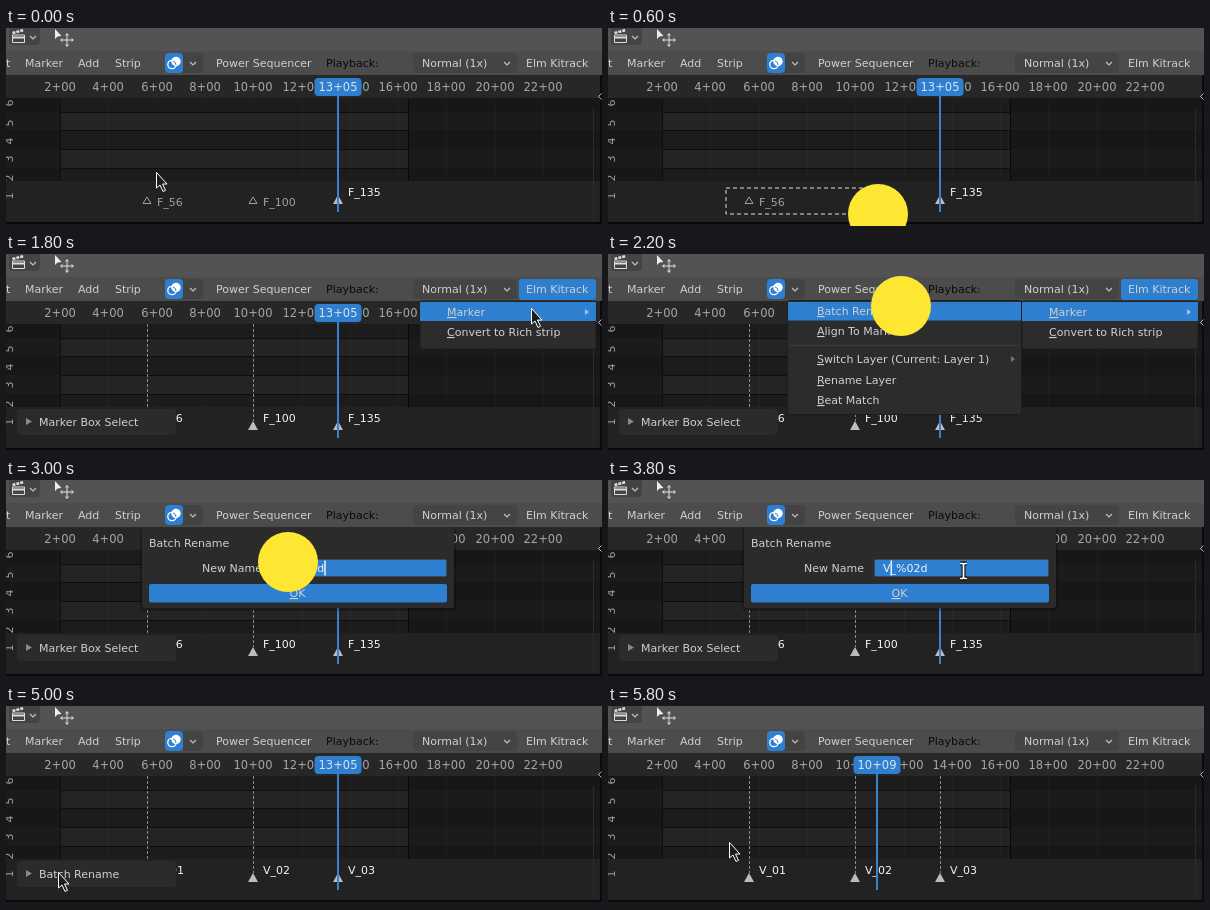
An HTML page that plays this animation: 596 px wide and 198 px high, repeating every 6000 ms.

```html
<!DOCTYPE html>
<html lang="en">
<head>
<meta charset="utf-8">
<title>Batch renaming markers</title>
<style>
html, body { margin: 0; width: 100%; height: 100%; overflow: hidden; background: #1a1a1a; }
svg { display: block; width: 596px; height: 198px; }
text { font: 11px "DejaVu Sans", Verdana, sans-serif; fill: #d0d0d0; white-space: pre; }
.tick { font-size: 11.5px; fill: #a6a6a6; }
.mid { text-anchor: middle; }
.key { text-decoration: underline; text-underline-offset: 2px; }
</style>
</head>
<body>
<svg id="stage" viewBox="0 0 596 198"></svg>
<script>
const NS = 'http://www.w3.org/2000/svg';
const stage = document.getElementById('stage');
const BLUE = '#2f7fd0';
const LOOP = 6000, STEP = 200;

function add(parent, tag, attrs = {}, content) {
  const el = document.createElementNS(NS, tag);
  for (const k in attrs) el.setAttribute(k, attrs[k]);
  if (content !== undefined) el.textContent = content;
  parent.appendChild(el);
  return el;
}
const group = (p = stage) => add(p, 'g');
const box = (p, x, y, width, height, fill, rx = 0, more = {}) =>
  add(p, 'rect', { x, y, width, height, fill, rx, ...more });
const label = (p, x, y, s, more = {}) => add(p, 'text', { x, y, ...more }, s);
const path = (p, d, more = {}) => add(p, 'path', { d, fill: 'none', ...more });
const show = (el, on) => el.setAttribute('display', on ? 'inline' : 'none');
const frameX = f => Math.round(5.7 + 2.415 * f);

// Label whose first letter is an underlined shortcut key
function keyLabel(p, x, y, s, more = {}) {
  const t = add(p, 'text', { x, y, ...more });
  add(t, 'tspan', { class: 'key' }, s[0]);
  add(t, 'tspan', {}, s.slice(1));
}
const chevron = (p, x, y) =>
  path(p, `M${x - 3} ${y - 1.5}l3 3l3 -3`, { stroke: '#c0c0c0', 'stroke-width': 1.2 });

function drawTimeline() {
  const g = group();
  box(g, 0, 46, 596, 152, '#191919');
  const rows = [70, 84, 102, 121, 140, 153];
  rows.slice(0, -1).forEach((y, i) => {
    const h = rows[i + 1] - y;
    box(g, 0, y, 594, h, i % 2 ? '#1b1b1b' : '#171717');
    box(g, 54, y, 349, h, i % 2 ? '#242424' : '#1c1c1c');
    if (i) box(g, 54, y, 349, 1, '#0e0e0e');
  });
  box(g, 0, 153, 594, 41, '#222');
  box(g, 54, 70, 1, 83, '#090909');
  box(g, 402, 70, 1, 83, '#090909');
  for (let s = 2; s <= 22; s += 2)
    box(g, frameX(s * 10), 70, 1, 83, '#fff', 0, { opacity: 0.025 });
  box(g, 0, 46, 596, 24, '#272727');
  for (let s = 2; s <= 22; s += 2)
    label(g, frameX(s * 10), 63, `${s}+00`, { class: 'tick mid' });
  [75, 95, 113, 131, 150, 168].forEach((y, i) =>
    label(g, 0, 0, 6 - i, { class: 'mid', transform: `translate(7 ${y}) rotate(-90)`, style: 'fill:#a0a0a0' }));
  box(g, 587, 80, 1, 113, '#2b2b2b');
  box(g, 594, 46, 2, 150, '#0b0b0b');
  box(g, 0, 194, 596, 2, '#080808');
  path(g, 'M595.5 65.5l-3 3l3 3', { stroke: '#bbb' });
}

function makeMarker(frame) {
  const g = group(), x = frameX(frame);
  const off = group(g), on = group(g);
  path(off, `M${x} 169l4 6.5h-8z`, { stroke: '#a0a0a0' });
  const offText = label(off, x + 10, 178, '', { style: 'fill:#a0a0a0' });
  path(on, `M${x + 0.5} 70V167`, { stroke: '#8c8c8c', 'stroke-dasharray': '3 2' });
  path(on, `M${x} 167l5 9h-10z`, { fill: '#bcbcbc' });
  const onText = label(on, x + 10, 168, '', { style: 'fill:#f4f4f4' });
  return (selected, name) => {
    show(on, selected);
    show(off, !selected);
    onText.textContent = offText.textContent = name;
  };
}

function makePlayhead() {
  const g = group();
  box(g, -1, 60, 2, 124, '#3a82cd');
  box(g, -23.5, 50, 47, 18, BLUE, 4);
  const t = label(g, 0, 63, '', { class: 'tick mid', style: 'fill:#d8e2ec' });
  return f => {
    g.setAttribute('transform', `translate(${frameX(f)} 0)`);
    t.textContent = `${Math.floor(f / 10)}+0${f % 10}`;
  };
}

function makePanel() {
  const g = group();
  box(g, 11, 155, 159, 26, '#2b2b2b', 4);
  path(g, 'M20 164l6 3.5l-6 3.5z', { fill: '#8a8a8a' });
  const t = label(g, 33, 172, '');
  return title => {
    show(g, title);
    t.textContent = title;
  };
}

function makeHeader() {
  const g = group();
  box(g, 0, 0, 596, 23, '#535353');
  box(g, 0, 23, 596, 24, '#4c4c4c');
  box(g, 3, -4, 31, 21, '#444', 4);
  // clapper board
  path(g, 'M6.500 7h12v7.500h-12z', { stroke: '#ddd' });
  path(g, 'M6.500 5l11.500 -3', { stroke: '#ddd', 'stroke-width': 2.5, 'stroke-dasharray': '3 1' });
  path(g, 'M6 9.500h12', { stroke: '#ddd', 'stroke-width': 2 });
  chevron(g, 27, 9.5);
  // select-and-move tool
  path(g, 'M49 1v10l2.500 -2.500l4 -.5z', { fill: '#eee' });
  path(g, 'M61 6v12M55 12h12M59.500 7.500l1.500 -2l1.500 2M59.500 16.500l1.500 2l1.500 -2M56.500 10.500l-2 1.500l2 1.500M65.500 10.500l2 1.500l-2 1.500',
    { stroke: '#e4e4e4' });
  label(g, 0, 39, 't');
  label(g, 19, 39, 'Marker');
  label(g, 72, 39, 'Add');
  label(g, 109, 39, 'Strip');
  box(g, 159, 25, 38, 20, '#434343', 4);
  box(g, 159, 25, 18, 20, BLUE, 4);
  add(g, 'circle', { cx: 170, cy: 33.5, r: 4.7, fill: '#fff' });
  add(g, 'circle', { cx: 166, cy: 36.5, r: 4.2, fill: 'none', stroke: '#fff', 'stroke-width': 1.3 });
  path(g, 'M167 33a4 4 0 0 1 3 4', { stroke: BLUE });
  chevron(g, 187, 35.5);
  label(g, 210, 39, 'Power Sequencer');
  label(g, 320, 39, 'Playback:', { style: 'fill:#0a0a0a' });
  box(g, 407, 25, 104, 20, '#444', 4);
  label(g, 416, 39, 'Normal (1x)');
  chevron(g, 501, 35.5);
  const hot = box(g, 513, 25, 77, 21, BLUE, 3);
  label(g, 520, 39, 'Elm Kitrack');
  return on => show(hot, on);
}

function makeMenus() {
  const main = group(), sub = group();
  const arrow = (p, x, y, fill) => path(p, `M${x} ${y - 3}l4 3l-4 3z`, { fill });
  const frame = { stroke: '#1c1c1c' };
  box(main, 414, 47, 176, 48, '#2c2c2c', 2, frame);
  box(main, 414, 48, 176, 19, BLUE);
  keyLabel(main, 441, 62, 'Marker');
  arrow(main, 579, 58, '#9fc2e6');
  keyLabel(main, 441, 82, 'Convert to Rich strip');
  box(sub, 179.5, 46.5, 234, 114, '#2c2c2c', 2, frame);
  box(sub, 180, 48, 233, 18.5, BLUE);
  box(sub, 181, 91, 231, 1, '#3c3c3c');
  const items = { 'Batch Rename': 61, 'Align To Markers': 81, 'Switch Layer (Current: Layer 1)': 109, 'Rename Layer': 130, 'Beat Match': 150 };
  for (const s in items) keyLabel(sub, 209, items[s], s);
  arrow(sub, 403, 105, '#777');
  return level => {
    show(main, level > 0);
    show(sub, level > 1);
  };
}

function makeDialog() {
  const g = group();
  box(g, 134, 48, 316, 83, '#000', 4, { opacity: 0.25 });
  box(g, 136, 47, 312, 81, '#2b2b2b', 3);
  label(g, 143, 67, 'Batch Rename');
  label(g, 256, 92, 'New Name', { 'text-anchor': 'end' });
  const field = box(g, 266.5, 79.5, 174, 17, BLUE, 2, { stroke: '#3a4a5c' });
  const t = label(g, 275, 92, '', { style: 'fill:#f2f2f2' });
  const caret = box(g, 0, 80.5, 1.5, 15, '#e8f2ff');
  box(g, 143, 104, 298, 18.5, BLUE, 2);
  keyLabel(g, 291.5, 117, 'OK', { class: 'mid' });
  return (open, text, pos) => {
    show(g, open);
    if (!open) return;
    t.textContent = text;
    field.setAttribute('fill', pos < 0 ? '#1d1d1d' : BLUE);
    show(caret, pos >= 0);
    caret.setAttribute('x', 275 + (pos > 0 ? t.getSubStringLength(0, pos) : 0));
  };
}

function makePointer() {
  const g = group();
  const beam = 'M-3.500 -7.500h2.500l1 1l1 -1h2.500M0 -6.500v13M-3.500 7.500h2.500l1 -1l1 1h2.500';
  const kinds = { arrow: group(g), beam: group(g), click: group(g) };
  path(kinds.arrow, 'M.5 .5V16l3.500 -3l3 6.500l2.500 -1.200l-3 -6.300h4.500z', { fill: '#1c1c1c', stroke: '#fff' });
  path(kinds.beam, beam, { stroke: '#111', 'stroke-width': 4 });
  path(kinds.beam, beam, { stroke: '#fff', 'stroke-width': 1.7 });
  add(kinds.click, 'circle', { r: 30, fill: '#fde732' });
  return (x, y, kind = 'arrow') => {
    g.setAttribute('transform', `translate(${x} ${y})`);
    for (const k in kinds) show(kinds[k], k === kind);
  };
}

drawTimeline();
const markers = [56, 100, 135].map(f => ({ frame: f, set: makeMarker(f) }));
const setHead = makePlayhead();
const setPanel = makePanel();
const setHot = makeHeader();
const setMenus = makeMenus();
const setDialog = makeDialog();
const lasso = box(stage, 118, 160, 152, 26, 'none', 0, { stroke: '#ddd', 'stroke-dasharray': '4 3' });
const setPointer = makePointer();

// Each entry changes part of the state from its time on
const script = [
  [0, { mouse: [150, 144], head: 135, panel: '', hot: false, menu: 0, dialog: false,
        text: 'F_%02d', caret: -1, all: false, renamed: false, lasso: false }],
  [200, { mouse: [128, 156] }],
  [400, { mouse: [118, 160, 'click'] }],
  [600, { mouse: [270, 186, 'click'], lasso: true }],
  [800, { mouse: [300, 172], lasso: false, all: true, panel: 'Marker Box Select' }],
  [1000, { mouse: [450, 92] }],
  [1200, { mouse: [537, 35], hot: true }],
  [1600, { mouse: [540, 46, 'click'] }],
  [1800, { mouse: [525, 54], menu: 1 }],
  [2000, { mouse: [400, 55], menu: 2 }],
  [2200, { mouse: [293, 52, 'click'] }],
  [2400, { mouse: [293, 56], menu: 0, hot: false, dialog: true }],
  [2600, { mouse: [289, 70] }],
  [2800, { mouse: [284, 86, 'beam'] }],
  [3000, { mouse: [282, 82, 'click'], caret: 6 }],
  [3200, { mouse: [320, 88, 'beam'] }],
  [3400, { mouse: [355.5, 91, 'beam'], caret: 1 }],
  [3600, { text: '_%02d', caret: 0 }],
  [3800, { text: 'V_%02d', caret: 1 }],
  [4000, { mouse: [318, 106], caret: -1 }],
  [4200, { mouse: [300, 113, 'click'] }],
  [4400, { mouse: [240, 128], dialog: false, renamed: true, panel: 'Batch Rename' }],
  [4600, { mouse: [140, 152] }],
  [4800, { mouse: [52, 166] }],
  [5200, { mouse: [290, 54, 'click'], panel: '', head: 118 }],
  [5400, { mouse: [269, 54, 'click'], head: 109 }],
  [5600, { mouse: [190, 100] }],
  [5800, { mouse: [121, 136] }]
];

function render(ms) {
  const s = {};
  for (const [at, change] of script) if (at <= ms) Object.assign(s, change);
  markers.forEach(({ frame, set }, i) =>
    set(s.all || frame === 135, s.renamed ? `V_0${i + 1}` : `F_${frame}`));
  setHead(s.head);
  setPanel(s.panel);
  setHot(s.hot);
  setMenus(s.menu);
  setDialog(s.dialog, s.text, s.caret);
  show(lasso, s.lasso);
  setPointer(...s.mouse);
}

const start = performance.now();
let last = -1;
function tick() {
  const ms = Math.floor(((performance.now() - start) % LOOP) / STEP) * STEP;
  if (ms !== last) render(last = ms);
  requestAnimationFrame(tick);
}
tick();
</script>
</body>
</html>
```
